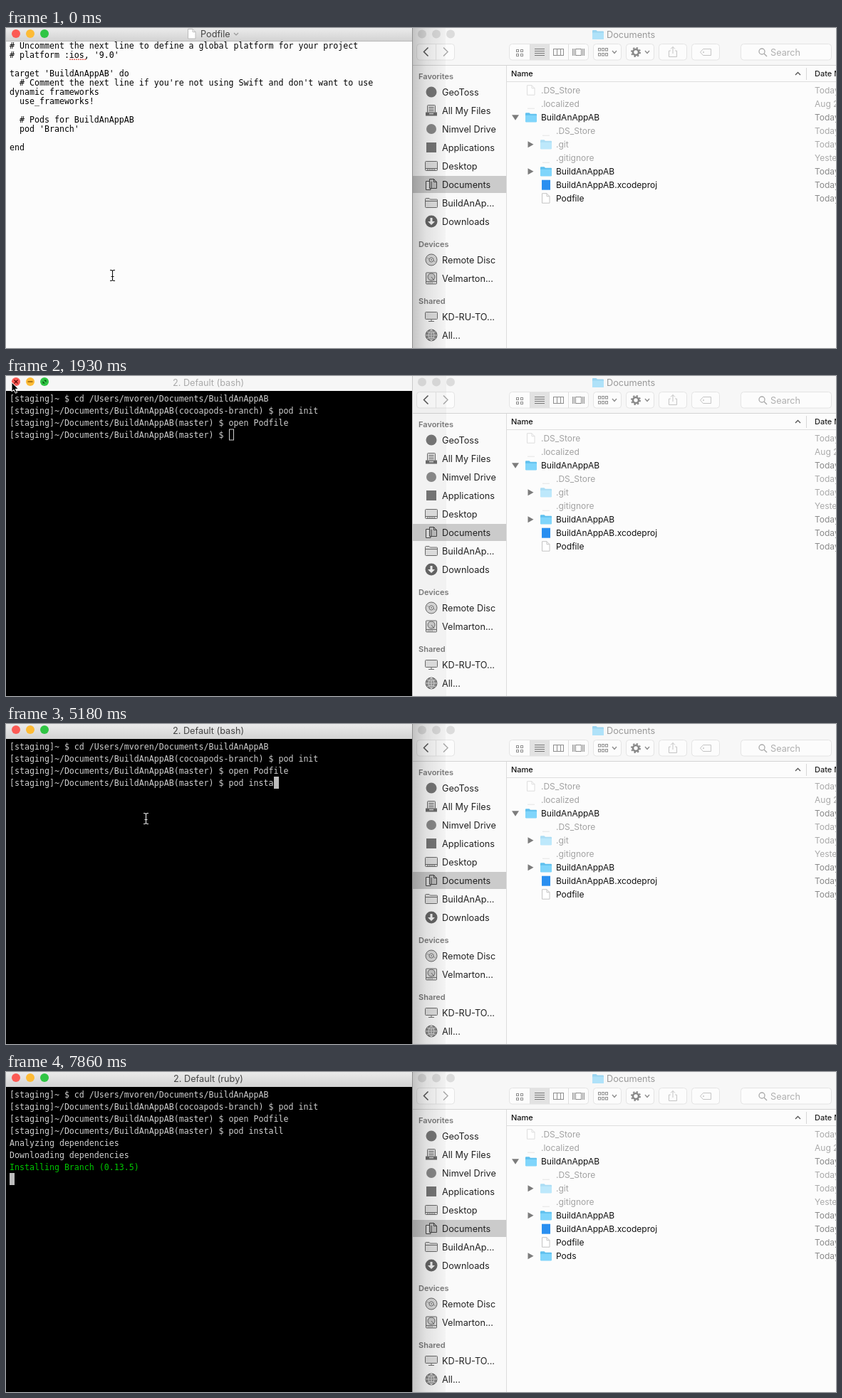
Animation of 1165x450 px, one loop 8 s. Source, as an HTML page:

```html
<!DOCTYPE html>
<html lang="en">
<head>
<meta charset="utf-8">
<title>Installing a pod</title>
<style>
html, body { margin: 0; width: 100%; height: 100%; overflow: hidden; background: #fcfcfc; }
svg { display: block; }
text { white-space: pre; font: 12px Inter, "Open Sans", sans-serif; }
.mono { font: 11.627px "DejaVu Sans Mono", monospace; }
.side { font-size: 12.7px; }
.head { font-size: 11px; font-weight: 600; }
.column { font-size: 11px; font-weight: 500; }
</style>
</head>
<body>
<svg width="1165" height="450" viewBox="0 0 1165 450">
  <defs>
    <linearGradient id="bar" x2="0" y2="1"><stop stop-color="#ebebeb"/><stop offset="1" stop-color="#d3d3d3"/></linearGradient>
    <linearGradient id="shade"><stop stop-opacity=".21"/><stop offset=".4" stop-opacity=".1"/><stop offset="1" stop-opacity=".025"/></linearGradient>
  </defs>
  <g id="finder"></g>
  <g id="front"></g>
</svg>
<script>
const LOOP = 8000;
const rect = (x, y, w, h, fill, more = '') =>
  `<rect x="${x}" y="${y}" width="${w}" height="${h}" fill="${fill}" ${more}/>`;
const disc = (x, y, r, fill, more = '') => `<circle cx="${x}" cy="${y}" r="${r}" fill="${fill}" ${more}/>`;
const line = (d, color, width = 1, more = '') =>
  `<path d="${d}" fill="none" stroke="${color}" stroke-width="${width}" ${more}/>`;
const shape = (d, fill, more = '') => `<path d="${d}" fill="${fill}" ${more}/>`;
const text = (x, y, s, fill = '#000', cls = '', more = '') =>
  `<text x="${x}" y="${y}" fill="${fill}" class="${cls}" ${more}>${s}</text>`;
const at = (x, y, s) => `<g transform="translate(${x} ${y})">${s}</g>`;

const page = (x, y, w = 11, h = 14, edge = '#bbb') =>
  at(x, y, shape(`M.5 .5H${w - 4}L${w} 4.5V${h}H.5Z`, '#fff', `stroke="${edge}"`) + line(`M${w - 4} .5V4.5H${w}`, edge));
const folder = (x, y, opacity = 1) => at(x, y, `<g opacity="${opacity}">` +
  shape('M0 2Q0 1 1 1H5.5L7 2.5H15Q16 2.5 16 3.5V13Q16 14 15 14H1Q0 14 0 13Z', '#5fc0ee') +
  rect(0, 4.5, 16, 9.5, '#80d5fb', 'rx="1"') + '</g>');

// Sidebar glyphs, each centred on 0,0
const INK = '#6c6c6c';
const box = (x, y, w, h, fill = '#e0e0e0') => rect(x, y, w, h, fill, `stroke="${INK}" rx="1"`);
const glyphs = {
  dot: disc(0, 0, 7.5, '#777'),
  ring: disc(0, 0, 7, '#8a8a8a'),
  square: rect(-7, -7, 14, 14, '#777'),
  files: box(-5.5, -7.5, 11, 11) + line('M-3.5 -4.5H3.5M-3.5 -2H3.5M-3.5 .5H3.5', INK) + shape('M-8 2.5H8V7.5H-8Z', INK) + rect(-3, 4, 6, 1.2, '#e5e5e5'),
  desktop: box(-8.5, -6.5, 17, 13) + line('M-8 3.5H8', INK) + line('M-6 5H6', INK, 1, 'stroke-dasharray="2 1"'),
  pages: shape('M-7.5 -4.5H-1V7.5H-7.5Z', '#ddd', 'stroke="#444"') + shape('M-2.5 -7.5H3.5L7.5 -3.5V5.5H-2.5Z', '#bbb', 'stroke="#444"') + line('M3.5 -7.5V-3.5H7.5M0 -4V5', '#444'),
  folder: shape('M-8.5 -5.5Q-8.5 -6.5 -7.5 -6.5H-3L-1.5 -5H7.5Q8.5 -5 8.5 -4V5.5Q8.5 6.5 7.5 6.5H-7.5Q-8.5 6.5 -8.5 5.5Z', '#e2e2e2', `stroke="${INK}"`) + line('M-8 -2.5H8', INK),
  down: disc(0, 0, 8.5, '#666') + shape('M-1.5 -5H1.5V0H5L0 5L-5 0H-1.5Z', '#f4f4f4'),
  remote: disc(0, 0, 8, '#d9d9d9', `stroke="${INK}"`) + disc(0, 0, 3, '#eee', `stroke="${INK}"`) + disc(0, 0, 1, INK) + line('M-6 -3L-3 -1M6 3L3 1', '#999'),
  drive: box(-7.5, -8, 15, 16) + disc(0, -2, 5, '#ccc', `stroke="${INK}"`) + line('M0 -2L4 3M-7 4.5H7', INK) + line('M-5 6.3H3', INK, 1, 'stroke-dasharray="1 1"'),
  screen: box(-8.5, -6.5, 17, 10) + line('M0 4V6.5M-4 6.5H4', INK),
  globe: disc(0, 0, 8, '#888', `stroke="${INK}"`) + line('M-8 0H8M0 -8V8M-6 -5Q0 -1 6 -5M-6 5Q0 1 6 5M0 -8Q-8 0 0 8Q8 0 0 -8', '#ddd', .9)
};
const sidebar = [
  [90, 'dot', 'GeoToss'], [116, 'files', 'All My Files'], [142, 'ring', 'Nimvel Drive'],
  [168, 'square', 'Applications'], [194, 'desktop', 'Desktop'], [220, 'pages', 'Documents'],
  [246, 'folder', 'BuildAnAp...'], [272, 'down', 'Downloads'], [326, 'remote', 'Remote Disc'],
  [352, 'drive', 'Velmarton...'], [406, 'screen', 'KD-RU-TO...'], [432, 'globe', 'All...']
];

function toolbar() {
  const grey = '#8e8e8e', button = (x, w) => rect(x + .5, 22.5, w, 22.5, '#fcfcfc', 'rx="4" stroke="#e4e4e4"');
  let s = rect(571, 0, 594, 52, '#f7f7f7') + [584, 604, 624].map(x => disc(x, 8.5, 6, '#dcdcdc')).join('');
  s += folder(823, 2, .6) + text(843, 14, 'Documents', '#999', 'side');
  s += button(576, 53) + line('M603.5 23V45', '#e4e4e4') + line('M592.5 27.5L586.5 33.5L592.5 39.5', '#555', 1.5) + line('M614 27.5L620 33.5L614 39.5', '#aaa', 1.5);
  s += button(706, 111) + rect(736, 23, 27, 22, '#e2e2e2') + line('M735.5 23V45M762.5 23V45M789.5 23V45', '#dedede');
  for (const x of [716, 722]) for (const y of [30, 36]) s += rect(x + .5, y + .5, 3, 3, 'none', `stroke="${grey}"`);
  s += line('M742 29.5H756M742 32.5H756M742 35.5H756M742 38.5H756', '#777');
  s += rect(768.5, 29.5, 14, 9, 'none', `stroke="${grey}"`) + line('M773.5 30V38M778.5 30V38', grey);
  s += rect(799.5, 29.5, 8, 9, 'none', `stroke="${grey}"`) + line('M795.5 29V39M797.5 29V39M809.5 29V39M811.5 29V39', grey);
  s += [[824, 39], [870, 39], [916, 39], [962, 39], [1031, 127]].map(b => button(...b)).join('');
  for (const x of [831, 836, 841]) for (const y of [28, 35]) s += rect(x + .5, y + .5, 3, 3.5, 'none', `stroke="${grey}"`);
  s += line('M851 32L854 35.5L857 32M897 32L900 35.5L903 32', grey, 1.4);
  s += disc(884, 34, 4, 'none', 'stroke="#888" stroke-width="2.6"') + disc(884, 34, 6, 'none', 'stroke="#888" stroke-width="2" stroke-dasharray="2.3 2.41"');
  s += line('M933 32H930.5V40.5H941.5V32H939M936 36V26.5M933 29.5L936 26.5L939 29.5', '#c4c4c4');
  s += line('M974.5 34L978.5 29.5H989.5V38.5H978.5Z', '#c4c4c4') + disc(979, 34, 1, '#c4c4c4');
  s += disc(1061, 33, 4, 'none', 'stroke="#aaa" stroke-width="1.3"') + line('M1064 36L1068 40', '#aaa', 1.5) + text(1073, 38.5, 'Search', '#b0b0b0', 'side');
  return s + rect(571, 52, 594, 1, '#d4d4d4');
}

// level, disclosure triangle, icon, name, date, dimmed
const files = [
  [0, '', 'page', '.DS_Store', 'Today, 2:14 PM', 1], [0, '', 'bare', '.localized', 'Aug 21, 2016', 1],
  [0, 'open', 'folder', 'BuildAnAppAB', 'Today, 2:20 PM'], [1, '', 'bare', '.DS_Store', 'Today, 2:14 PM', 1],
  [1, 'shut', 'folder', '.git', 'Today, 2:19 PM', 1], [1, '', 'bare', '.gitignore', 'Yesterday', 1],
  [1, 'shut', 'folder', 'BuildAnAppAB', 'Today, 2:14 PM'], [1, '', 'project', 'BuildAnAppAB.xcodeproj', 'Today, 2:14 PM'],
  [1, '', 'page', 'Podfile', 'Today, 2:20 PM'], [1, 'shut', 'folder', 'Pods', 'Today, 2:21 PM']
];
function fileRow([level, arrow, icon, name, date, dim], i) {
  const x = 729 + level * 21, y = 87.7 + i * 19;
  let s = text(x + 22, y + 4.3, name, dim ? '#a2a2a2' : '#111') + text(1135, y + 4.3, date, dim ? '#aaa' : '#8a8a8a');
  if (arrow) s += at(x - 14, y, shape(arrow === 'open' ? 'M-5 -3.5H5L0 4Z' : 'M-3.5 -4.5L4.5 0L-3.5 4.5Z', '#7c7c7c'));
  if (icon === 'folder') s += folder(x, y - 7.5, dim ? .5 : 1);
  if (icon === 'page') s += page(x + 2, y - 7.5, 11, 14, dim ? '#ddd' : '#c4c4c4');
  if (icon === 'bare') s += rect(x + 3, y + 6, 10, 1, '#e4e4e4');
  if (icon === 'project') s += rect(x + 2, y - 7, 12, 14, '#2a8ff0');
  return s;
}

function finder() {
  let s = rect(571, 0, 594, 450, '#fcfcfc') + rect(571, 53, 131, 397, '#fafafa') + toolbar();
  s += rect(571, 208, 131, 24, '#cbcbcb') + rect(702, 53, 1, 397, '#dcdcdc');
  s += [[72, 'Favorites'], [308, 'Devices'], [388, 'Shared']].map(([y, n]) => text(579, y, n, '#7b7b7b', 'head')).join('');
  for (const [y, icon, name] of sidebar) s += at(597, y, glyphs[icon]) + text(612, y + 4.8, name, '#222', 'side');
  s += rect(703, 75, 462, 1, '#dedede') + rect(1123, 56, 1, 17, '#d8d8d8');
  s += text(709, 68, 'Name', '#111', 'column') + text(1135, 68, 'Date Modified', '#222', 'column') + line('M1108 66L1111.5 62.5L1115 66', '#555', 1.3);
  return s + files.slice(0, -1).map(fileRow).join('');
}

function lights(hover, pressed) {
  let s = disc(14, 8, 6, pressed ? '#b8443f' : '#fc5b55') + disc(34, 8, 6, '#fdbb36') + disc(54, 8, 6, '#30c544');
  if (hover) s += line('M11.5 5.5L16.5 10.5M16.5 5.5L11.5 10.5', '#5d0b08', 1.2) + line('M30.5 8H37.5', '#8c5a0a', 1.4) +
    shape('M51.5 7V10.5H55ZM53 5.5H56.5V9Z', '#0a5a12');
  return s;
}

const podfile = `# Uncomment the next line to define a global platform for your project
# platform :ios, '9.0'

target 'BuildAnAppAB' do
  # Comment the next line if you're not using Swift and don't want to use
dynamic frameworks
  use_frameworks!

  # Pods for BuildAnAppAB
  pod 'Branch'

end`.split('\n');

function editor(t) {
  let s = rect(0, 0, 570, 450, '#fcfcfc') + rect(0, 0, 570, 18, 'url(#bar)') + rect(0, 18, 570, 1, '#b9b9b9');
  s += lights(t >= 740, t >= 1640) + page(255, 1) + text(273, 13, 'Podfile', '#444', 'side') + line('M320 7L323 10L326 7', '#999', 1.2);
  podfile.forEach((row, i) => s += text(5, 29 + i * 13, row, '#000', 'mono'));
  s += line('M89 44.2H112', '#e8635a', 1.6, 'stroke-dasharray="2 1"');
  return s + (t >= 740 ? rect(103, 136, 1, 13, '#000') : '');
}

const prompt = '[staging]~/Documents/BuildAnAppAB(master) $ ';
const history = [
  '[staging]~ $ cd /Users/mvoren/Documents/BuildAnAppAB',
  '[staging]~/Documents/BuildAnAppAB(cocoapods-branch) $ pod init',
  prompt + 'open Podfile'
];
const output = [[7560, 'Analyzing dependencies'], [7710, 'Downloading dependencies'], [7860, 'Installing Branch (0.13.5)']];
const command = 'pod install';
const keyTimes = [3870, ...Array.from({ length: 8 }, (_, i) => 4170 + i * 144), 5480, 5630];

function terminal(t) {
  const active = t >= 3120, entered = t >= 6230;
  const typed = keyTimes.filter(k => t >= k).length;
  const rows = [...history, prompt + command.slice(0, typed), ...output.filter(o => t >= o[0]).map(o => o[1])];
  let s = rect(0, 0, 570, 450, '#000') + rect(0, 0, 570, 21, active ? 'url(#bar)' : '#f6f6f6');
  s += lights(t < 2530) + text(284, 13.5, `2. Default (${t < 7120 ? 'bash' : 'ruby'})`, active ? '#444' : '#aaa', 'side', 'text-anchor="middle"');
  rows.forEach((row, i) => s += text(5, 36 + i * 17, row, i === 6 ? '#00c400' : '#d0d0d0', 'mono'));
  const x = entered ? 5 : 313 + typed * 7, y = 23 + (entered ? rows.length : 3) * 17;
  return s + (active ? rect(x, y, 7, 17, '#bdbdbd') : rect(x + .5, y + 1, 6, 15, 'none', 'stroke="#d0d0d0"'));
}

// time, x, y, pointer kind
const pointerPath = [
  [0, 149, 348, 'beam'], [300, 112, 256, 'beam'], [450, 33, 170, 'beam'], [590, 12, 62, 'beam'], [740, 9, 15, 'arrow'],
  [890, 9, 11, 'arrow'], [1040, 8, 10, 'arrow'], [1190, 8, 9, 'arrow'],
  [2380, 24, 17, 'arrow'], [2530, 80, 53, 'arrow'], [2680, 148, 102, 'arrow'], [2820, 186, 127, 'arrow'], [2970, 196, 133, 'arrow'],
  [3120, 196, 133, 'beam'], [6530, 190, 276, 'beam'], [6670, 0, 0, '']
];
function pointer(t) {
  const [, x, y, kind] = pointerPath.filter(p => t >= p[0]).pop();
  if (kind === 'arrow') return at(x, y, shape('M0 0V13L3 10.2L5.3 15.2L7.6 14.2L5.4 9.3H9.5Z', '#000', 'stroke="#fff"'));
  if (!kind) return '';
  const d = 'M-3.5 -7.5H-1.5L0 -6.5L1.5 -7.5H3.5M0 -6.5V6.5M-3.5 7.5H-1.5L0 6.5L1.5 7.5H3.5M-2 1.5H2';
  const dark = t >= 1930;
  return at(x + .5, y, line(d, dark ? '#000' : '#fff', 2.4) + line(d, dark ? '#e8e8e8' : '#111', 1.1));
}

function front(t) {
  const soft = t >= 1930 && t < 3120;
  let s = t >= 7860 ? fileRow(files[9], 9) : '';
  s += soft ? rect(571, 0, 47, 450, '#000', 'opacity=".03"') : rect(571, 0, 46, 450, 'url(#shade)');
  s += rect(570, 0, 1, 450, soft ? '#c9c9c9' : '#8f8f8f');
  return s + (t < 1930 ? editor(t) : terminal(t)) + pointer(t);
}

document.getElementById('finder').innerHTML = finder();
const layer = document.getElementById('front');
const begin = performance.now();
let shown = '';
function draw() {
  const next = front((performance.now() - begin) % LOOP);
  if (next !== shown) layer.innerHTML = shown = next;
  requestAnimationFrame(draw);
}
draw();
</script>
</body>
</html>
```
